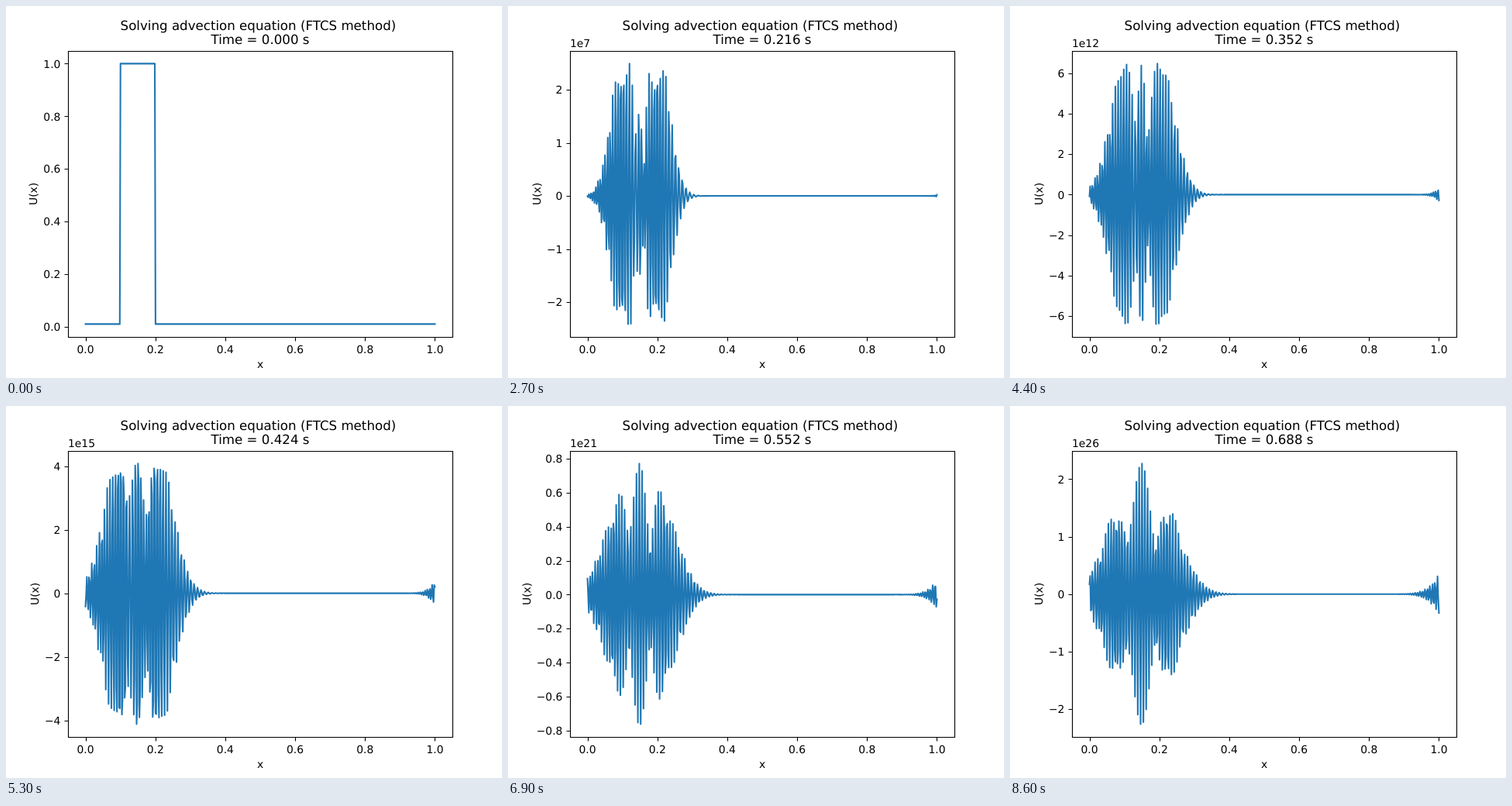
An HTML page for the animation above (8.7 s loop, 640 by 480 pixels).

```html
<!DOCTYPE html>
<html lang="en">
<head>
<meta charset="utf-8">
<title>Advection, FTCS</title>
<style>
  html, body { margin: 0; width: 100%; height: 100%; overflow: hidden; background: #fff; }
  svg { display: block; width: 100%; height: 100%; }
  text { font: 13.889px "DejaVu Sans", sans-serif; fill: #000; text-rendering: geometricPrecision; }
  .title { font-size: 16.667px; text-anchor: middle; }
  .mid { text-anchor: middle; }
  .end { text-anchor: end; }
  .axis { fill: none; stroke: #000; stroke-width: 1.111; }
</style>
</head>
<body>
<svg viewBox="0 0 640 480">
  <clipPath id="clip"><rect x="80" y="57.6" width="496" height="369.6"/></clipPath>
  <path id="curve" clip-path="url(#clip)" fill="none" stroke="#1f77b4" stroke-width="2.083"
        stroke-linecap="square" stroke-linejoin="round"/>
  <path class="axis" d="M80.5 58.5H576.5V427.5H80.5Z"/>
  <path class="axis" id="xMarks"/>
  <path class="axis" id="yMarks"/>
  <g id="xLabels"></g>
  <g id="yLabels"></g>
  <text class="mid" x="328" y="467">x</text>
  <text class="mid" id="yName">U(x)</text>
  <text id="power" x="80" y="53"></text>
  <text class="title" x="325.4" y="31">Solving advection equation (FTCS method)</text>
  <text class="title" id="clock" x="328" y="49"></text>
</svg>
<script>
const N = 500, COURANT = 0.4, STEPS = 10, FRAMES = 87, FRAME_MS = 100, FRAME_TIME = 0.008;
const TOP = 57.6, BOTTOM = 427.2, EM = 13.889;
const $ = id => document.getElementById(id);
const px = x => 80 + 496 * (x + 0.05) / 1.1;
const snap = v => Math.floor(v + 0.5) + 0.5;
const label = (x, y, cls, s) => `<text class="${cls}" x="${x}" y="${y}">${s}</text>`;

// Forward in time, centred in space, periodic ends
function advance(u) {
  return u.map((v, i) => v - COURANT / 2 * (u[(i + 1) % N] - u[(i + N - 1) % N]));
}

function simulate() {
  let u = Float64Array.from({ length: N }, (_, i) => {
    const x = i / (N - 1);
    return x >= 0.1 && x <= 0.2 ? 1 : 0.01;
  });
  const states = [u];
  while (states.length < FRAMES) {
    for (let s = 0; s < STEPS; s++) u = advance(u);
    states.push(u);
  }
  return states;
}

// Round tick step with at most nine intervals, shared power of ten, fewest decimals
function makeTicks(lo, hi) {
  const raw = (hi - lo) / 9;
  let exp = Math.floor(Math.log10(raw));
  let m = [1, 2, 2.5, 5, 10].find(s => s * 10 ** exp >= raw);
  if (m === 10) { m = 1; exp++; }
  const step = m * 10 ** exp;
  const first = Math.floor(lo / step), last = Math.ceil(hi / step);
  const biggest = Math.max(Math.abs(first), Math.abs(last)) * step;
  let power = Math.floor(Math.log10(biggest) + 1e-9);
  if (power < 6 && power > -5) power = 0;

  const unit = m * 10 ** (exp - power);
  const ks = Array.from({ length: last - first + 1 }, (_, i) => first + i);
  const oom = Math.floor(Math.log10((last - first) * unit) + 1e-9);
  const exact = d => ks.every(k =>
    Math.abs(k * unit - Math.round(k * unit * 10 ** d) / 10 ** d) < 1e-3 * 10 ** oom);
  let digits = Math.max(0, 3 - oom);
  while (digits > 0 && exact(digits - 1)) digits--;

  const list = ks.filter(k => k * step >= lo && k * step <= hi).map(k => ({
    value: k * step,
    text: (k < 0 ? "\u2212" : "") + Math.abs(k * unit).toFixed(digits)
  }));
  return { list, power };
}

function textWidth(s) {
  return EM * [...s].reduce((w, c) => w + (c === "." ? 0.318 : c === "\u2212" ? 0.838 : 0.636), 0);
}

const states = simulate();

function draw(n) {
  const u = states[n];
  const min = Math.min(...u), max = Math.max(...u), pad = (max - min) * 0.05;
  const lo = min - pad, hi = max + pad;
  const py = v => BOTTOM - (BOTTOM - TOP) * (v - lo) / (hi - lo);

  $("curve").setAttribute("d", "M" + Array.from(u, (v, i) =>
    px(i / (N - 1)).toFixed(3) + " " + py(v).toFixed(3)).join("L"));

  const { list, power } = makeTicks(lo, hi);
  $("yMarks").setAttribute("d", list.map(t => `M80.5 ${snap(py(t.value))}h-5`).join(""));
  $("yLabels").innerHTML = list.map(t =>
    label(70.4, Math.round(py(t.value) + 5.28), "end", t.text)).join("");
  $("power").textContent = power ? "1e" + power : "";

  const widest = Math.max(...list.map(t => textWidth(t.text)));
  const base = Math.round(70.28 - widest - 5.56 - 2.9 + 0.5);
  $("yName").setAttribute("transform", `translate(${base} 242.4) rotate(-90)`);
  $("clock").textContent = `Time = ${(n * FRAME_TIME).toFixed(3)} s`;
}

const xs = [0, 0.2, 0.4, 0.6, 0.8, 1];
$("xMarks").setAttribute("d", xs.map(x => `M${snap(px(x))} 427.5v5`).join(""));
$("xLabels").innerHTML = xs.map(x => label(px(x).toFixed(2), 448, "mid", x.toFixed(1))).join("");

let shown = -1;
function tick() {
  const n = Math.floor(performance.now() / FRAME_MS) % FRAMES;
  if (n !== shown) draw(shown = n);
  requestAnimationFrame(tick);
}
tick();
</script>
</body>
</html>
```
